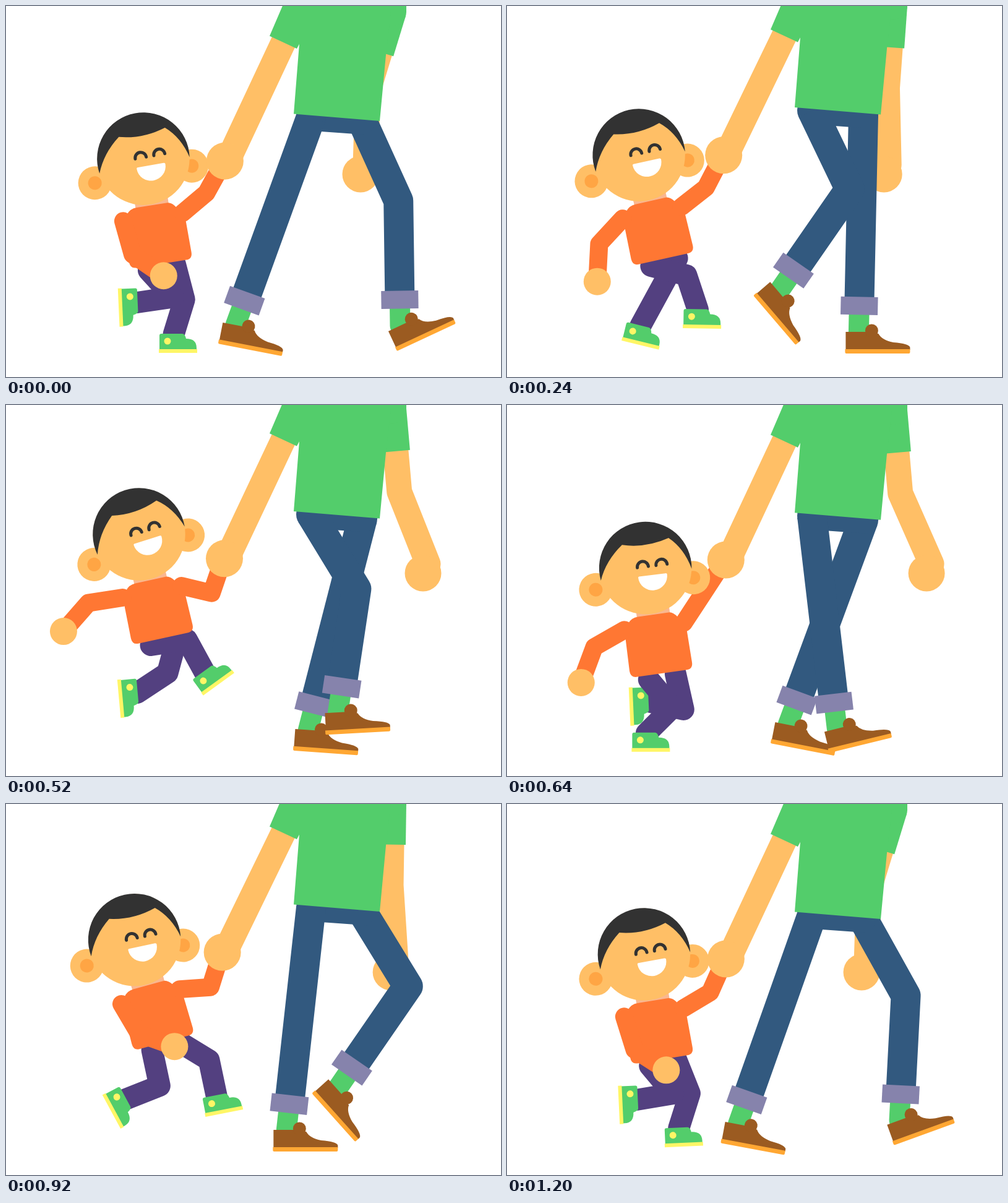
Recreate the animation shown at these times as an HTML page with a canvas. Size 800 px wide and 600 px high, loop 1240 ms.

```html
<!DOCTYPE html>
<html lang="en">
<head>
<meta charset="utf-8">
<title>Walking together</title>
<style>
  html, body { margin: 0; width: 100%; height: 100%; overflow: hidden; background: #fff; }
  canvas { display: block; width: 800px; height: 600px; }
</style>
</head>
<body>
<canvas id="stage" width="800" height="600"></canvas>
<script>
const ctx = document.getElementById('stage').getContext('2d');
const LOOP = 1240, STEP = 40, CYCLE = 1208;
const DEG = Math.PI / 180;
const STANCE = 0.53;  // share of a cycle with the foot down, also the lag between legs
const { sin, cos, PI } = Math;

const C = {
  green: '#53cd6b', skin: '#ffbf66', jeans: '#32597f', cuff: '#8683ac',
  shoe: '#9b5b21', sole: '#ffa733', orange: '#ff7733', purple: '#534080',
  hair: '#323232', yellow: '#fff666', ear: '#ffa544', neck: '#fab78f'
};

// Key poses of the child's foot over one stride: phase, ankle x, ankle y, angle.
const KID_STRIDE = [[0, 271, 531, 0], [0.14, 221, 530, 0], [0.36, 208, 462, 82],
  [0.6, 244, 492, 88], [0.66, 290, 512, 29], [0.9, 377, 408, -37], [0.96, 337, 431, -36]];

const lerp = (a, b, u) => a + (b - a) * u;
const wave = (angle, mean, c, s) => mean + c * cos(angle) + s * sin(angle);

// Shape-preserving cubic through cyclic key poses.
function sample(keys, u) {
  const n = keys.length;
  const key = i => keys[(i + n) % n];
  const at = i => key(i)[0] + Math.floor(i / n);
  let i = n - 1;
  while (keys[i][0] > u) i--;
  const h = at(i + 1) - at(i), w = (u - at(i)) / h;
  return keys[0].slice(1).map((_, k) => {
    const v = j => key(j)[k + 1];
    const slope = j => (v(j + 1) - v(j)) / (at(j + 1) - at(j));
    const tangent = j => {
      const a = slope(j - 1), b = slope(j);
      return a * b > 0 ? 2 * a * b / (a + b) : 0;
    };
    const a = v(i), b = v(i + 1), ma = tangent(i) * h, mb = tangent(i + 1) * h;
    return a + w * (ma + w * (3 * (b - a) - 2 * ma - mb + w * (2 * (a - b) + ma + mb)));
  });
}

// Middle joint of a two-part limb; it stretches straight when the end is out of reach.
function joint([x, y], [ex, ey], upper, lower, side = 1) {
  const dx = ex - x, dy = ey - y, d = Math.hypot(dx, dy);
  const along = d < upper + lower
    ? (d * d + upper * upper - lower * lower) / (2 * d)
    : d * upper / (upper + lower);
  const off = d < upper + lower ? side * Math.sqrt(Math.max(0, upper * upper - along * along)) : 0;
  return [x + (dx * along + dy * off) / d, y + (dy * along - dx * off) / d];
}

// Point at a distance from p; angle 0 points down, positive to the right.
function reach([x, y], angle, length) {
  return [x + sin(angle * DEG) * length, y + cos(angle * DEG) * length];
}

function attach([x, y, angle], px, py) {
  const c = cos(angle * DEG), s = sin(angle * DEG);
  return [x + px * c - py * s, y + px * s + py * c];
}

function circle(x, y, r, color) {
  ctx.fillStyle = color;
  ctx.beginPath();
  ctx.arc(x, y, r, 0, 7);
  ctx.fill();
}

function limb(points, width, color, cap = 'round') {
  ctx.strokeStyle = color;
  ctx.lineWidth = width;
  ctx.lineCap = cap;
  ctx.lineJoin = 'round';
  ctx.beginPath();
  points.forEach(p => ctx.lineTo(...p));
  ctx.stroke();
}

function shape(path, color) {
  ctx.fillStyle = color;
  ctx.fill(new Path2D(path));
}

function placed(x, y, angle, draw) {
  ctx.save();
  ctx.translate(x, y);
  ctx.rotate(angle * DEG);
  draw();
  ctx.restore();
}

// Ankle and foot angle: slide back on the ground, then swing forward in an arc.
function adultStride(u) {
  if (u < STANCE) {
    const s = u / STANCE;
    const toeUp = Math.max(0, 1 - s * 4), heelUp = Math.max(0, (s - 0.7) / 0.3);
    return [lerp(637, 454, s), 527 - 10 * (2 * s - 1) ** 4, 11 * heelUp - 25 * toeUp];
  }
  const w = (u - STANCE) / (1 - STANCE), arc = sin(PI * w) ** 0.8;
  return [lerp(454, 637, w ** 1.15), 516 - 55 * arc, lerp(11, -25, w) + 55 * arc];
}

function adultLeg(u, hip, shift) {
  const [x, ay, foot] = adultStride(u % 1);
  const ax = x + shift;
  const knee = joint(hip, [ax, ay], 141, 202);
  const shin = Math.atan2(ax - knee[0], ay - knee[1]) / DEG;
  const cuff = reach([ax, ay], shin, -42);
  limb([cuff, [ax, ay]], 33, C.green);
  placed(ax, ay, foot, () => {
    ctx.translate(-22, 35);
    shape('M1-6V-35H33L54-32Q59-22 78-18Q103-16 105-10V-6Z', C.shoe);
    circle(43, -37, 10.5, C.shoe);
    shape('M0-7H105V-2Q105 0 103 0H2Q0 0 0-2Z', C.sole);
  });
  circle(...hip, 24, C.jeans);
  limb([hip, knee, cuff], 48, C.jeans, 'butt');
  placed(...cuff, -shin, () => {
    ctx.fillStyle = C.cuff;
    ctx.fillRect(-30, -14.5, 60, 29);
  });
}

function drawAdult(u, p, bob) {
  const swing = -3 - 11 * cos(p) - 3 * cos(2 * p);
  const handX = 626 - 53 * cos(p);
  const shoulder = [624, 10 + bob];

  limb([shoulder, reach(shoulder, swing, 134), [handX + 8, 257]], 41, C.skin);
  circle(handX, 272, 29.5, C.skin);

  adultLeg(u, [576, 187 + bob], 0);
  placed(0, bob, 0, () => shape('M468 172L603 182L586 209L488 202Z', C.jeans));
  adultLeg(u + STANCE, [493, 180 + bob], -83);

  const hand = [354 + bob * 0.35, 251 + bob * 0.9];
  limb([[453, 49 + bob], [hand[0] + 5, hand[1] - 1]], 41, C.skin);
  circle(...hand, 30, C.skin);

  limb([shoulder, reach(shoulder, swing, 68)], 46, C.green, 'butt');
  circle(...shoulder, 23, C.green);
  placed(0, bob, 0, () => shape(
    'M468-49L426 49L470 69.5L474 62L465 175L604 186.5L614 80L622 10L647 10V-49Z', C.green));
}

function kidLeg(u, hip, shift) {
  const [x, ay, foot] = sample(KID_STRIDE, u % 1);
  const ankle = [x + shift, ay];
  limb([hip, joint(hip, ankle, 59, 59), ankle], 35, C.purple);
  placed(...ankle, foot, () => {
    ctx.translate(-24, 30);
    shape('M1-5V-28Q1-31 4-31H38Q42-31 44-23Q61-23 61-8V-5Z', C.green);
    circle(14, -19, 5.5, C.yellow);
    ctx.fillStyle = C.yellow;
    ctx.fillRect(0, -6, 62, 6);
  });
}

function drawHead() {
  for (const x of [-84, 75]) {
    circle(x, 24.6, 27, C.skin);
    circle(x, 24.6, 11, C.ear);
  }
  circle(0, 0, 74.5, C.skin);
  shape('M-74 11A74.8 74.8 0 1 1 74 10Q66-24 43-44Q5-32-33-42Q-62-20-74 11Z', C.hair);
  ctx.strokeStyle = C.hair;
  ctx.lineWidth = 5;
  ctx.lineCap = 'round';
  for (const x of [-4, 26.5]) {
    ctx.beginPath();
    ctx.arc(x, -2.5, 9, PI, 0);
    ctx.stroke();
  }
  shape('M-12 12H31Q33.5 12 33.5 14A23.5 23 0 0 1-13.5 14Q-13.5 12-12 12Z', '#fff');
}

function drawKid(u, p, bob) {
  const hop = 2 * p;  // the body hops once per step
  const torso = [
    wave(hop, 253, -2, -3),
    wave(hop, 403, 14, 38) + 6 * sin(2 * hop),
    wave(hop, -12, 3, 3)
  ];
  const headTilt = wave(hop, -12, 2, 7) - 3 * sin(p);

  kidLeg(u, attach(torso, 22, 4), 0);
  kidLeg(u + STANCE, attach(torso, -22, 7), -16);

  placed(...torso, () => {
    ctx.fillStyle = C.neck;
    ctx.fillRect(-27, -118, 54, 26);
    shape('M-41 0Q-51 0-51-11L-50-62Q-47-96-25-96H25Q38-96 50-62L51-11Q51 0 41 0Z', C.orange);
  });

  const heldShoulder = attach(torso, 47, -76);
  const held = [352 + bob * 0.35, 252 + bob * 0.9];
  limb([heldShoulder, joint(heldShoulder, held, 50, 58, -1), held], 29, C.orange);

  placed(...attach(torso, -2, -172), headTilt, drawHead);

  const shoulder = attach(torso, -50, -78);
  const hand = reach(shoulder, -60 * cos(p - 135 * DEG) - 6 * cos(hop), 110);
  limb([shoulder, joint(shoulder, hand, 56, 61, -1), hand], 29, C.orange);
  circle(...hand, 22, C.skin);
}

const start = performance.now();

function frame() {
  const t = Math.floor((performance.now() - start) % LOOP / STEP) * STEP;
  const u = t / CYCLE % 1, p = 2 * PI * u;
  const bob = wave(2 * p, -6.4, 6, 0.5);
  ctx.fillStyle = '#fff';
  ctx.fillRect(0, 0, 800, 600);
  drawKid(u, p, bob);
  drawAdult(u, p, bob);
  requestAnimationFrame(frame);
}
frame();
</script>
</body>
</html>
```
